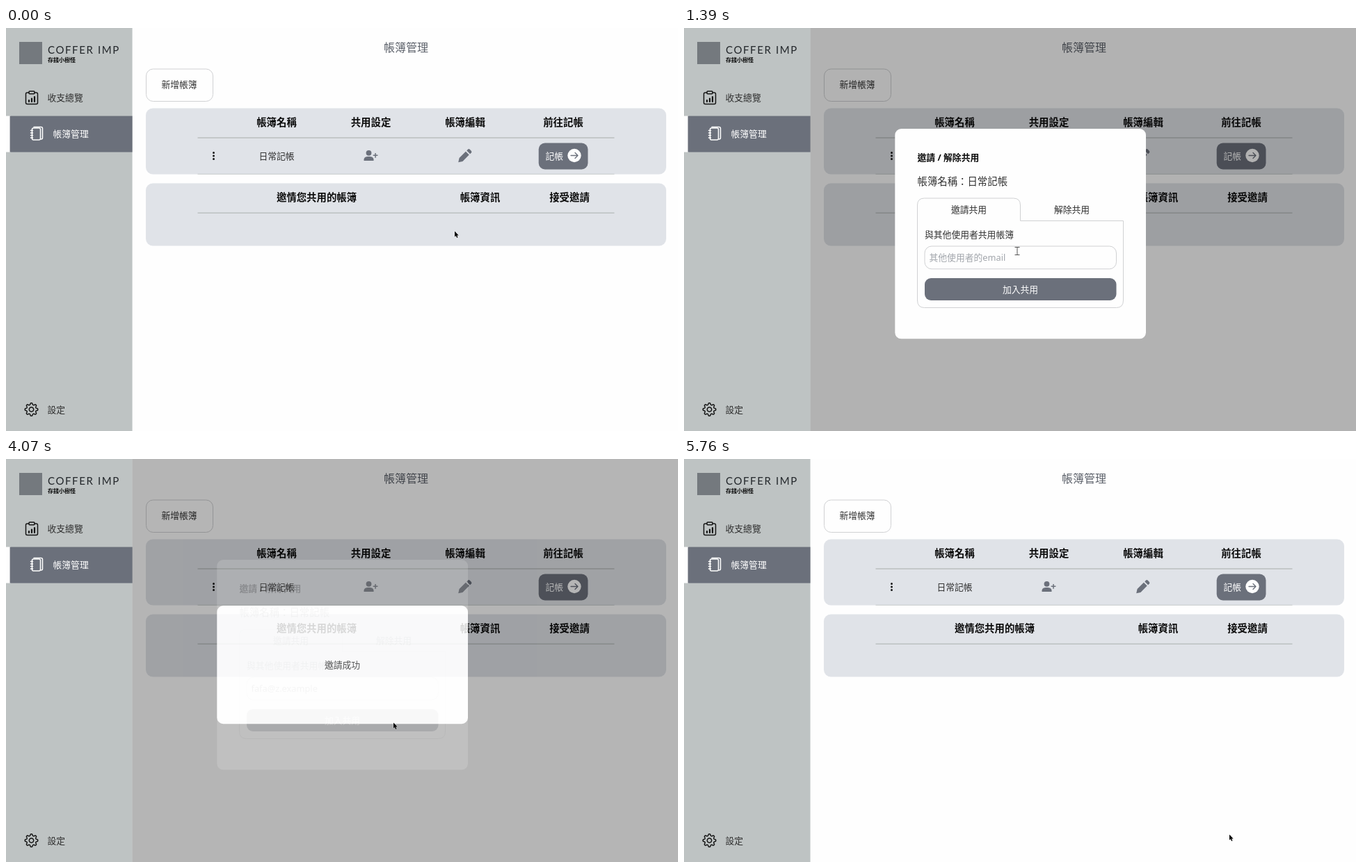
Recreate the animation shown at these times as an HTML page. Size 966x580 px, loop 5810 ms.

```html
<!DOCTYPE html>
<html lang="zh-Hant">
<head>
<meta charset="utf-8">
<title>帳簿管理</title>
<style>
  html, body { margin: 0; width: 100%; height: 100%; overflow: hidden; background: #fefefe; }
  svg { display: block; width: 100%; height: 100%; }
  text { font: 12.8px "Noto Sans", "Noto Sans CJK TC", "Noto Sans CJK", sans-serif; fill: #303030; white-space: pre; }
  .mid { text-anchor: middle; }
  .big { font-size: 14.4px; }
  .title { font-size: 16px; font-weight: 500; fill: #5c616a; }
  .bold { font-weight: 700; fill: #0b0b0b; }
  .white { fill: #fff; }
  .hint { fill: #a1a5ab; }
  .brand { font: 15px Lato, sans-serif; letter-spacing: 1.6px; fill: #24282c; }
  .sub { font-size: 8px; }
  .slate { fill: #6b707b; }
  .mist { fill: #bec3c3; }
  .card { fill: #e0e3e8; }
  .paper { fill: #fefefe; }
  .edge { stroke: #d0d1d3; }
  .line { fill: none; stroke-linecap: round; stroke-linejoin: round; }
  .pointer path { stroke: #fff; stroke-width: .6; paint-order: stroke; }
  .pointer .beam { fill: none; stroke: #555; stroke-width: 1; }
</style>
</head>
<body>
<svg viewBox="0 0 966 580">
  <rect class="paper" width="966" height="580"/>

  <!-- sidebar -->
  <rect class="mist" width="181.6" height="580"/>
  <rect x="19" y="20" width="33" height="32" fill="#74797e"/>
  <text class="brand" x="60" y="37.3">COFFER IMP</text>
  <text class="sub bold" x="60" y="49">存錢小樹怪</text>

  <g class="line" stroke="#161616" stroke-width="1.5">
    <path d="M33 93H30.5Q28.5 93 28.5 95V107.500Q28.500 109.500 30.500 109.500H43.500Q45.500 109.500 45.500 107.500V95Q45.500 93 43.500 93H41"/>
    <rect x="33" y="91" width="8" height="3.8" rx="1"/>
    <path stroke-width="2.2" d="M33 104V106M37 101.500V106M41 99V106"/>
  </g>
  <text x="59.5" y="105.3">收支總覽</text>

  <rect class="paper" y="126.6" width="7" height="52"/>
  <rect class="slate" x="5.6" y="126.6" width="176" height="52"/>
  <g class="line" stroke="#fff" stroke-width="1.5">
    <rect x="37.5" y="144" width="12" height="17" rx="2"/>
    <path d="M40 142.500H50.500Q52.500 142.500 52.500 144.500V158Q52.500 160 50.500 160"/>
    <path d="M35.500 147.500H38.500M35.500 151H38.500M35.500 154.500H38.500M35.500 158H38.500"/>
  </g>
  <text class="white" x="67.5" y="157">帳簿管理</text>

  <g class="line" stroke="#161616" stroke-width="1.5" transform="translate(36.5 549)">
    <path id="gear"/>
    <circle r="3.2"/>
  </g>
  <text x="59.5" y="554">設定</text>

  <!-- page -->
  <text class="mid title" x="575" y="34">帳簿管理</text>
  <rect class="paper edge" x="201.5" y="59" width="96" height="46.5" rx="10"/>
  <text class="mid" x="249" y="86">新增帳簿</text>

  <rect class="card" x="201" y="115.5" width="748" height="95" rx="10"/>
  <text class="mid big bold" x="389" y="141">帳簿名稱</text>
  <text class="mid big bold" x="524.5" y="141">共用設定</text>
  <text class="mid big bold" x="660" y="141">帳簿編輯</text>
  <text class="mid big bold" x="801" y="141">前往記帳</text>
  <rect class="mist" x="275.5" y="157.2" width="599" height="1.6"/>
  <rect class="mist" x="275.5" y="209.8" width="599" height=".8"/>
  <g fill="#161616">
    <circle cx="298.5" cy="179.5" r="1.5"/>
    <circle cx="298.5" cy="184" r="1.5"/>
    <circle cx="298.5" cy="188.5" r="1.5"/>
  </g>
  <text class="mid" x="389" y="188.5">日常記帳</text>
  <g id="person" fill="#6b707b">
    <circle cx="521.5" cy="179.8" r="3.9"/>
    <path d="M514.500 191V189.600C514.500 186.400 517 185 521.500 185S528.500 186.400 528.500 189.600V191Z"/>
    <path d="M530.300 180h1.500v2.600h2.600v1.500h-2.600v2.600h-1.500v-2.600h-2.600v-1.500h2.600z"/>
  </g>
  <g class="slate">
    <path d="M650.200 193.300l1.400-6.200 9.300-9.300 4.800 4.800-9.300 9.300z"/>
    <path d="M662.300 176.400l1.800-1.800q1.200-1.100 2.400 0l2.400 2.400q1.100 1.200 0 2.400l-1.800 1.800z"/>
  </g>
  <rect class="slate" x="765.7" y="165.5" width="70.8" height="38" rx="9"/>
  <text class="white" x="775.5" y="188.5">記帳</text>
  <circle class="paper" cx="817" cy="183.5" r="9.7"/>
  <path class="line" stroke="#6b707b" stroke-width="1.3" d="M812 183.500H822M818 179.500L822 183.500L818 187.500"/>

  <rect class="card" x="201" y="223.5" width="748" height="90" rx="10"/>
  <text class="mid big bold" x="446.5" y="249">邀情您共用的帳簿</text>
  <text class="mid big bold" x="681.5" y="249">帳簿資訊</text>
  <text class="mid big bold" x="810" y="249">接受邀請</text>
  <rect class="mist" x="275.5" y="265.4" width="599" height="1.6"/>

  <!-- invite dialog -->
  <g id="invite" opacity="0">
    <rect x="181.6" width="785" height="580" fill-opacity=".3"/>
    <rect class="paper" x="303.3" y="145" width="360.7" height="302.3" rx="9"/>
    <text class="bold" x="335.5" y="191">邀請 / 解除共用</text>
    <text class="big" x="335.5" y="225.5">帳簿名稱：日常記帳</text>
    <path class="line edge" d="M335.500 392V255Q335.500 245 345.500 245H473.500Q483.500 245 483.500 255V277.500H631.500V392Q631.500 402.500 621.500 402.500H345.500Q335.500 402.500 335.500 392Z"/>
    <text class="mid" x="409.5" y="265.5">邀請共用</text>
    <text class="mid" x="557.5" y="265.5">解除共用</text>
    <text x="346" y="301.7">與其他使用者共用帳簿</text>
    <rect class="paper edge" x="346" y="314" width="275.5" height="32.8" rx="10"/>
    <text id="field" x="352.5" y="334.7"></text>
    <rect class="slate" x="346" y="360" width="275.5" height="32" rx="9"/>
    <text class="mid white" x="483.5" y="380.5">加入共用</text>
    <g id="hover" opacity="0">
      <rect class="mist" x="346" y="360" width="275.5" height="32" rx="9"/>
      <text class="mid bold" x="483.5" y="380.5">加入共用</text>
    </g>
  </g>

  <!-- success dialog -->
  <g id="success" opacity="0">
    <rect x="181.6" width="785" height="580" fill-opacity=".3"/>
    <rect class="paper" x="303.3" y="211" width="360.7" height="170.2" rx="9"/>
    <text class="mid" x="483.5" y="300.7">邀請成功</text>
  </g>

  <g id="pointer" class="pointer">
    <path id="arrow" transform="translate(0 -.6) scale(.9)" d="M0 0V9l2-1.800 1.500 3.400 1.500-.700-1.500-3.200h2.800z"/>
    <path id="hand" d="M-1.100 1q1-1.700 2.100 0v3.800q3.600.200 4.900 1.700.500 2.200-.900 5.300h-5.400l-3.600-4.600q.300-1.500 1.900-.500l1 1z"/>
    <path id="beam" class="beam" d="M-3.500-5.500H3.500M0-5.500V5.500M-3.500 5.500H3.500"/>
  </g>
</svg>
<script>
  const LOOP = 5810, TICK = LOOP / 84;
  const $ = id => document.getElementById(id);

  // time, x, y of the pointer tip
  const stops = [
    [0, 645, 293], [277, 530, 181], [830, 530, 181],
    [1314, 479, 320], [1383, 479, 321], [1730, 479, 321],
    [2075, 903, 574], [2352, 835, 548], [2491, 835, 548],
    [3113, 561, 394], [3320, 557, 380], [4496, 557, 380],
    [4800, 604, 456], [5258, 604, 456], [5741, 784, 541]
  ];

  // the CSS "ease" curve
  function ease(x) {
    if (x <= 0) return 0;
    if (x >= 1) return 1;
    const bez = (a, b, s) => 3 * a * s * (1 - s) ** 2 + 3 * b * s * s * (1 - s) + s ** 3;
    let lo = 0, hi = 1;
    for (let i = 0; i < 20; i++) {
      const s = (lo + hi) / 2;
      if (bez(.25, .25, s) < x) lo = s; else hi = s;
    }
    return bez(.1, 1, lo);
  }

  const ramp = (t, start, length) => ease((t - start) / length);
  const pulse = (t, on, off, length) => ramp(t, on, length) - ramp(t, off, length);
  const within = (t, a, b) => t >= a && t < b;
  const show = (id, on) => $(id).setAttribute('visibility', on ? 'visible' : 'hidden');
  const fade = (id, value) => $(id).setAttribute('opacity', value.toFixed(3));

  function place(t) {
    let i = 0;
    while (i < stops.length - 2 && t > stops[i + 1][0]) i++;
    const [t0, x0, y0] = stops[i], [t1, x1, y1] = stops[i + 1];
    const u = Math.min(1, (t - t0) / (t1 - t0)), k = u * u * (3 - 2 * u);
    return [x0 + (x1 - x0) * k, y0 + (y1 - y0) * k];
  }

  function draw(time) {
    // the screen refreshes in even ticks
    const t = Math.min(83, Math.floor((time + 15) / TICK)) * TICK;

    fade('invite', pulse(t, 740, 3930, 300));
    fade('success', pulse(t, 3930, 5195, 300));
    fade('hover', pulse(t, 3115, 3667, 200));

    const typed = t > 2540;
    $('field').textContent = typed ? 'fafa@z.example' : '其他使用者的email';
    $('field').setAttribute('class', typed ? '' : 'hint');
    $('person').setAttribute('fill', within(t, 250, 760) ? '#4b5563' : '#6b707b');

    const hand = within(t, 250, 760) || within(t, 3170, 3700);
    const beam = within(t, 1240, 1740);
    show('hand', hand);
    show('beam', beam);
    show('arrow', !hand && !beam);
    $('pointer').setAttribute('transform', `translate(${place(t).map(n => n.toFixed(1))})`);
  }

  let gear = '';
  for (let i = 0; i < 96; i++) {
    const a = i / 96 * Math.PI * 2, r = 8.1 + 1.2 * Math.tanh(2 * Math.cos(8 * a));
    gear += (i ? 'L' : 'M') + (r * Math.cos(a)).toFixed(2) + ' ' + (r * Math.sin(a)).toFixed(2);
  }
  $('gear').setAttribute('d', gear + 'Z');

  const begin = performance.now();
  function run() {
    draw((performance.now() - begin) % LOOP);
    requestAnimationFrame(run);
  }
  run();
</script>
</body>
</html>
```
